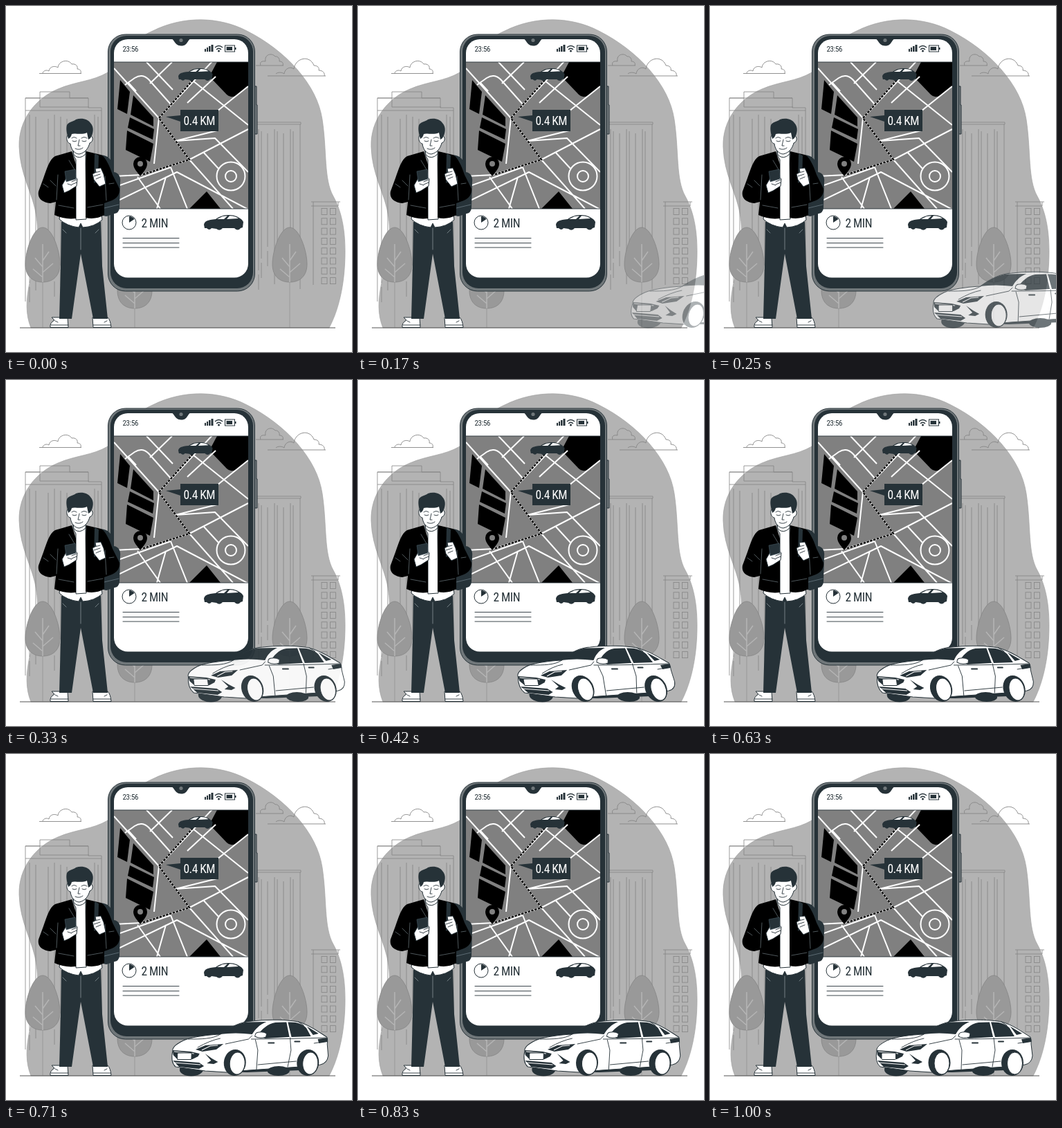
Animation, 500 px wide and 500 px high, one loop 1040 ms. Source, as an HTML page:

```html
<!DOCTYPE html>
<html lang="en">
<head>
<meta charset="utf-8">
<title>Ride arriving</title>
<style>
html, body { margin: 0; width: 100%; height: 100%; overflow: hidden; background: #fff; }
svg { display: block; width: 100vw; height: 100vh; }
text { font-family: "Roboto Condensed", "Open Sans Condensed", Roboto, "Liberation Sans", sans-serif; font-stretch: condensed; letter-spacing: -.03em; }
.line { fill: none; stroke: #263238; stroke-width: .9; stroke-linecap: round; stroke-linejoin: round; }
.body { fill: #fff; stroke: #263238; stroke-width: 1; stroke-linejoin: round; }
.dark { fill: #263238; }
.city { fill: none; stroke: #858585; stroke-width: .8; }
.road { fill: none; stroke: #fff; stroke-width: 2; stroke-linejoin: round; }
</style>
</head>
<body>
<svg viewBox="0 0 500 500">
  <defs>
    <clipPath id="mapArea"><rect x="156" y="81" width="194" height="212"/></clipPath>
    <g id="tree">
      <path d="M0-40C14-40 25-6 25 13C25 30 15 39 0 39S-25 30-25 13C-25-6-14-40 0-40Z" fill="#999" stroke="#858585" stroke-width=".8"/>
      <path d="M0 39V-16M0 8L9-5M0 17L-11 4M0 25L15 12M0 32L-14 20" fill="none" stroke="#b5b5b5" stroke-width="1.5"/>
    </g>
    <g id="cab">
      <path class="dark" d="M0 14C1 9 5 7 17 6C24 1 29 0 37 0C45 0 50 3 55 7L57 10L56 18L53 19Q49 24 44 19H27Q23 24 18 20L11 19Q8 23 4 19H1Z"/>
      <path d="M19 6L27 2L34 1.2L29 6ZM37 1.2Q45 1 50 5L33 6Z" fill="#fff"/>
    </g>
  </defs>

  <!-- backdrop -->
  <path fill="#b3b3b3" stroke="#a3a3a3" stroke-width=".7" d="M36 465C28 445 29 425 34 400C42 370 49 340 44 305C40 272 20 245 19 203C18 165 42 134 75 120C100 109 125 109 147 96C160 78 180 50 212 36C258 13 310 16 348 36C404 64 450 114 457 164C464 210 459 250 473 275C484 295 490 320 490 355C490 395 483 435 467 465Z"/>
  <path class="city" d="M28 427V133H49V124H92V133H119V147H138V427M28 133H119M49 133V146H120M28 151H138M360 168H426V171H360M425 171V409M441 283H483M444 283V403M441 289H480V283"/>
  <g id="city" class="city"></g>
  <g fill="#fff" stroke="#858585" stroke-width=".9">
    <path d="M48 97.500H109M53 97C54 93 59 92 62 94C63 87 71 86 75 89C76 79 90 76 95 84C101 83 104 87 103 91C107 91 109 94 108 97"/>
    <path fill="none" d="M361 86H401M368 86C366 81 370 79 375 80C373 70 384 67 389 73C393 72 396 77 395 80C400 80 401 83 400 86"/>
    <path fill="none" d="M378 101H462M390 98C393 95 400 96 402 98C403 90 411 87 416 91C418 75 439 70 445 86C451 86 453 90 452 93C458 93 461 97 460 101"/>
  </g>
  <path d="M53 398V465M410 398V465M186 436V465" stroke="#a2a2a2" stroke-width="1.500"/>
  <use href="#tree" x="53" y="360"/>
  <use href="#tree" x="410" y="360"/>
  <use href="#tree" x="186" y="398"/>
  <path d="M20 465H476" stroke="#555" stroke-width="1.2"/>

  <!-- phone -->
  <path d="M357 116H362V143H363V185H357Z" fill="#70777a" stroke="#263238"/>
  <rect x="147.500" y="41" width="212" height="371" rx="25" fill="#70777a" stroke="#263238"/>
  <rect x="151" y="43" width="206" height="365" rx="23" class="dark"/>
  <rect x="156" y="48" width="194" height="344.500" rx="20" fill="#fff"/>
  <path class="dark" d="M238 47C244 48 243 57 253 57.500S262 48 268 47Z"/>
  <circle cx="253" cy="49.500" r="2.600" fill="#70777a"/>
  <text x="168.500" y="66" font-size="11" class="dark">23:56</text>
  <g class="dark">
    <path d="M287 66V62H289V66ZM290 66V60H292V66ZM293 66V58H295.500V66ZM296.500 66V56H299.500V66Z"/>
    <circle cx="307.500" cy="65" r="1.500"/>
    <path d="M304 63Q307.500 59.500 311 63M302 60Q307.500 55 313 60" fill="none" stroke="#263238" stroke-width="1.400"/>
    <rect x="316.500" y="57" width="14" height="9" fill="none" stroke="#263238"/>
    <path d="M318.500 59H327V64H318.500ZM331 60H332.500V63H331Z"/>
  </g>

  <!-- map -->
  <g clip-path="url(#mapArea)">
    <rect x="156" y="81" width="194" height="212" fill="#808080"/>
    <path d="M165 107L179 124L175 156L161 149ZM184 129L213 161V174L180 157ZM179 161L214 178L212 193L176 176ZM175 180L213 199L208 225L173 208Z
      M305 81H350V116L333 129Q325 134 319 128L297 105Q293 101 297 96ZM290 268L310 293H265Z"/>
    <path class="road" d="M156 90L221 162L214 228M172 114L186 104Q197 97 206 106L238 142M176 110L188 123M208 112L240 81M241 121L203 81M221 162L300 78
      M270 108L350 172M262 140L303 102M305 152L350 116M245 195L305 180M245 195L302 191L350 240M221 162L265 222L328 293M265 222L350 178
      M156 246L196 244L265 222M156 262L238 233L262 293M156 284L247 240L350 294M190 247L223 293M231 247L218 293M285 211L308 236"/>
    <circle cx="325" cy="246" r="20.500" class="road" style="fill:#808080"/>
    <circle cx="325" cy="246" r="8" class="road"/>
    <g fill="none" stroke-width="2.400">
      <path d="M270 107L221 162L265 222L196 244" stroke="#ddd"/>
      <path d="M270 107L221 162L265 222L196 244" stroke="#111" stroke-dasharray="3.500 1.500"/>
    </g>
    <path d="M194 246C190 240 184 235 184 228A10 10 0 0 1 204 228C204 235 198 240 194 246Z"/>
    <circle cx="194" cy="228" r="4" fill="#808080"/>
    <use href="#cab" transform="translate(249 90) scale(.87 .84)"/>
    <path class="dark" d="M252 150H307V181H252V167L231 160L252 158Z"/>
    <text x="256.500" y="172" font-size="17.500" fill="#fff">0.4 KM</text>
  </g>
  <path d="M156 81H350M156 293H350" class="line"/>

  <!-- trip summary -->
  <circle cx="178" cy="313" r="10" class="body"/>
  <path class="dark" d="M178 313V304A9 9 0 0 1 185.500 308Z"/>
  <text x="195.500" y="319.500" font-size="17.500" class="dark">2 MIN</text>
  <path class="line" d="M169 335.500H250M169 342.500H250M169 349H250"/>
  <use href="#cab" x="286" y="302"/>

  <!-- traveller -->
  <path class="dark" d="M132 215C151 214 155 226 156 240C163 241 166 247 165 255L164 292Q163 299 157 300L145 304Q135 303 136 292Z"/>
  <path class="line" d="M143 270L163 263M142 292L163 287" style="stroke:#63717a"/>
  <path class="body" d="M66 450H89L90 464.500H64Q63 458 70 454ZM125 450H147Q151 454 152 464.500H126Z"/>
  <path class="line" d="M65 461H90M126 461H151M71 455L75 457M142 457L146 455"/>
  <path class="dark" d="M80 312L79 376L77 452H95L108 358L126 452H147L139 376L137 312Z"/>
  <path class="line" d="M108 321L108 352M82 323L87 328M134 323L129 328" style="stroke:#7d898e"/>
  <path class="body" d="M78 302L77 308Q88 318 105 320L108 314L111 320Q128 319 139 309L138 302Z"/>
  <path class="body" d="M97 207V215L101 222V309L116 308L115 215L115 207Z"/>
  <path d="M95 210L71 217C63 221 59 235 54 249L47 268C45 279 54 284 64 285L72 283L70 302Q85 309 101 307V229ZM116 210L137 215C144 218 150 232 154 244L164 264C165 272 160 278 153 281L142 285V302Q130 309 115 306V228Z"/>
  <path class="line" d="M75 244L73 280M143 246L145 281M64 252L72 260M54 257L61 262M149 257L156 256M91 223L100 238M76 288L98 292M118 291L140 287" style="stroke:#596267"/>
  <path class="dark" d="M128 213L134 216L133 252L127 256Z"/>
  <path class="body" d="M129 235L137 234L141 243L144 257L135 261L127 251L125 243L130 240Z"/>
  <path class="line" d="M128 241L136 239M127 246L136 243M130 250L137 247"/>
  <path class="body" d="M81 259L88 247L97 245L103 250L102 260L91 267L84 270Z"/>
  <path class="dark" d="M85 239L100 236L101 250L87 254Z" stroke="#455a64" stroke-width=".6"/>
  <path class="line" d="M95 254L102 251M95 258L102 255M89 257L95 259"/>
  <path class="body" d="M97 207L98 215Q106 223 115 214V205Z"/>
  <path class="body" d="M91 186C86 186 87 198 93 199C94 208 100 214 106 214C115 212 119 205 121 198C127 196 126 187 121 187L119 180H93Z"/>
  <path class="dark" d="M90 192C89 187 86 179 88 172C91 167 98 167 101 164C110 161 119 164 122 169C128 175 126 185 122 191L119 193L117 183C109 187 99 183 95 185Q94 190 90 192Z"/>
  <path class="line" d="M95 191Q98 188 102 191M109 191Q113 188 117 191M96 195Q99 197 102 195M110 195Q113 197 116 195M106 193L104 202L107 202M100 206Q106 209 111 205"/>

  <!-- arriving car -->
  <g id="car">
    <g class="dark">
      <ellipse cx="269" cy="456" rx="17" ry="9.500"/>
      <path d="M284 450H438L426 457L350 460L300 459Z"/>
    </g>
    <path class="body" d="M241 429C240 424 246 419 256 414C270 408 290 406 309 405C322 395 338 387 354 386C377 383 407 384 421 387C437 391 450 401 463 409Q465 413 464 419L466 436Q465 447 455 449L441 451L352 457L320 460L289 458L246 452Q238 445 241 429Z"/>
    <ellipse class="dark" cx="395" cy="458" rx="16" ry="7"/>
    <path class="dark" d="M308 405C322 395 335 389 347 387.500L375 387C365 391 359 398 355 405Q331 402 308 405ZM362 407C369 398 376 390 388 388L404 387.500L409 409L374 411ZM406 387.500C420 387 427 390 433 396L440 408L412 409ZM426 389L451 404L443 406L434 394Z"/>
    <path class="line" d="M263 412C282 412 298 412 309 405M309 411Q294 414 277 424M355 407L350 412L317 419M354 412Q410 412 462 410M360 413L364 428L363 456M410 410L412 428L408 452M365 449L420 444M421 387L429 392M445 418L464 415"/>
    <path class="line" d="M379 417.500H387M417 415.500H424" style="stroke-width:2"/>
    <path class="body" d="M360 404C363 401 372 401 376 404L375 409Q366 412 359 408Z"/>
    <g class="dark">
      <path d="M274 427L288 421L314 419L304 427L284 430ZM241 428L267 430L280 433L278 437L270 441L247 440L242 435ZM242 443L280 446L287 451L280 455L251 452ZM288 433L298 440L307 445L301 448L291 447L297 443ZM450 412L464 410V416L452 418Z"/>
    </g>
    <path d="M283 428L295 422L306 421M243 430L272 433M244 446L282 449" fill="none" stroke="#fff" stroke-width="1"/>
    <rect x="248" y="432" width="20.500" height="9.500" rx="1" class="body"/>
    <g id="wheels"></g>
  </g>
</svg>
<script>
const $ = id => document.getElementById(id);
const rows = (n, make) => Array.from({ length: n }, (_, i) => make(i)).join('');

// Facade lines and windows
const bars = (xs, top, bottom) => xs.map((x, i) =>
  `<path d="M${x} ${top + i % 3 * 3}V${bottom - i * 17 % 43}M${x} ${bottom + 6 - i * 17 % 43}v22"/>`).join('');
$('city').innerHTML =
  bars([34, 43, 61, 70, 79, 88, 128, 133], 157, 400) +
  bars([365, 369, 378, 388, 392, 401, 411, 415], 178, 382) +
  rows(8, i => [456, 468.5].map(x =>
    `<rect x="${x}" y="${292.5 + i * 14.3}" width="8" height="9"/>`).join(''));

const wheel = (x, y) => `<g transform="translate(${x} ${y})">
  <ellipse class="dark" cx="-2" rx="16" ry="19"/>
  <ellipse class="body" cx="1.5" cy="1" rx="11" ry="16"/></g>`;
$('wheels').innerHTML = wheel(333.5, 446) + wheel(439, 446);

const LOOP = 1040, FPS = 24, LEAD = 28, AXIS = 425;
const stops = [
  { at: 0, x: 250, skew: -20, alpha: 0 },
  { at: 600, x: 0, skew: 10, alpha: 1 },
  { at: 800, x: 0, skew: -2, alpha: 1 },
  { at: 1000, x: 0, skew: 0, alpha: 1 }
];

const bezier = (a, b, s) => 3 * (1 - s) ** 2 * s * a + 3 * (1 - s) * s * s * b + s ** 3;

// cubic-bezier(.36, -.01, .5, 1.38), solved by bisection
function ease(u) {
  let lo = 0, hi = 1;
  for (let i = 0; i < 24; i++) {
    const mid = (lo + hi) / 2;
    if (bezier(.36, .5, mid) < u) lo = mid; else hi = mid;
  }
  return bezier(-.01, 1.38, lo);
}

function draw(now) {
  const ms = now % LOOP;
  const step = Math.floor((Math.floor(ms / 10) + .499) * FPS / 100);
  const t = Math.min(step * 1000 / FPS + LEAD, 1000);
  const i = t < 600 ? 0 : t < 800 ? 1 : 2;
  const a = stops[i], b = stops[i + 1];
  const p = ease((t - a.at) / (b.at - a.at));
  const mix = key => a[key] + (b[key] - a[key]) * p;
  $('car').setAttribute('transform',
    `translate(${mix('x')} ${AXIS}) skewX(${mix('skew')}) translate(0 ${-AXIS})`);
  $('car').setAttribute('opacity', step < 2 ? 0 : Math.max(0, Math.min(1, mix('alpha'))));
}

const start = performance.now();
function tick() {
  draw(performance.now() - start);
  requestAnimationFrame(tick);
}
tick();
</script>
</body>
</html>
```
